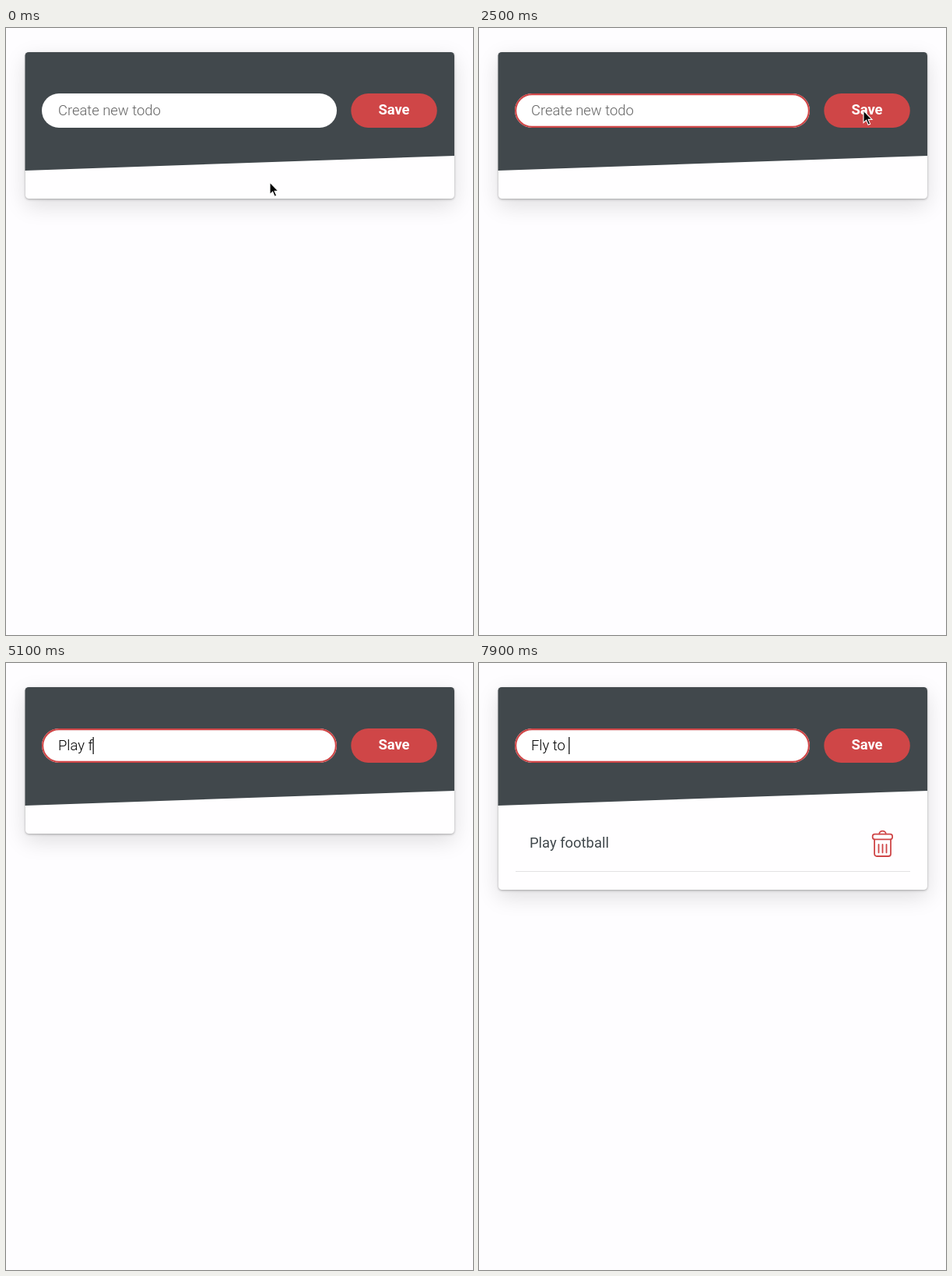
Recreate the animation shown at these times as an HTML page. Size 600x779 px, loop 8000 ms.

```html
<!DOCTYPE html>
<html lang="en">
<head>
<meta charset="utf-8">
<title>Todo list</title>
<style>
html, body { margin: 0; width: 100%; height: 100%; overflow: hidden; background: #fefdff; }
#card {
  position: absolute; left: 24.5px; top: 31px; width: 551.5px; height: 188px;
  border-radius: 4.5px; background: #fffeff;
  box-shadow: 0 1px 3px rgba(0,0,0,.3), 0 9px 28px rgba(0,0,0,.13);
}
svg { position: absolute; left: 0; top: 0; }
text { font: 18.4px Roboto, sans-serif; white-space: pre; }
</style>
</head>
<body>
<div id="card"></div>
<svg width="600" height="779" viewBox="0 0 600 779">
  <path d="M24.5 183V35.5a4.5 4.5 0 0 1 4.5-4.5H571.5a4.5 4.5 0 0 1 4.5 4.5V164Z" fill="#41484c"/>
  <rect x="46" y="84" width="379" height="44" rx="22" fill="#fff"/>
  <rect id="ring" x="47.1" y="85.1" width="376.8" height="41.8" rx="20.9" fill="none" stroke="#cf4647" stroke-width="2.2"/>
  <text id="field" x="67" y="112.3" style="font-weight:300"></text>
  <rect id="caret" y="95" width="1.2" height="22"/>
  <rect x="443.3" y="84" width="110.5" height="44" rx="22" fill="#cf4647"/>
  <text x="498.5" y="111.3" text-anchor="middle" fill="#fff" style="font-weight:700">Save</text>
  <g id="item">
    <text x="65" y="237.3" fill="#41484c">Play football</text>
    <path d="M47 267.5H554" stroke="#e2e1e3"/>
    <g fill="none" stroke="#cf4647" stroke-width="1.8" stroke-linecap="round">
      <rect x="505.7" y="219.6" width="25.4" height="6.8" rx="2.8"/>
      <path d="M514.3 219.3a4.2 3.6 0 0 1 8.4 0M508.1 226.6V245a3 3 0 0 0 3 3H526a3 3 0 0 0 3-3V226.6M513.5 233V243.3M518.5 233V243.3M523.5 233V243.3"/>
    </g>
  </g>
  <path id="arrow" d="M0 0V15.6L3.6 12.3 6.1 18.2 8.6 17.1 6.1 11.4H11Z" stroke="#fff" stroke-width="1.1"/>
  <path id="beam" d="M-3.5-8.5Q0-8.5 0-6Q0-8.5 3.5-8.5M0-6V6M-3.5 8.5Q0 8.5 0 6Q0 8.5 3.5 8.5M-2 2H2" fill="none" stroke="#000" stroke-width="1.3"/>
</svg>
<script>
const $ = id => document.getElementById(id);
const show = (el, on) => el.setAttribute('visibility', on ? 'visible' : 'hidden');
const ramp = (t, from, to) => Math.min(1, Math.max(0, (t - from) / (to - from)));

const LOOP = 8000, STEP = 100, BLINK = 260;
const TYPING = 4400, ADDED = 6100;

// Pointer path: time, x, y
const path = [
  [50, 339, 198], [400, 170, 102], [1750, 170, 102], [2000, 412, 83],
  [2400, 494, 106], [2700, 494, 106], [3000, 349, 50], [3300, 323, 101]
];

// Field value from each time on; null means no focus
const edits = [
  [0, null], [450, ''], [2800, null], [3340, ''],
  [4400, 'P'], [4600, 'Pl'], [4800, 'Pla'], [5000, 'Play '], [5100, 'Play f'],
  ...[...'ootball'].map((_, i) => [5300 + i * 100, 'Play football'.slice(0, 7 + i)]),
  [6060, ''], [7300, 'F'], [7500, 'Fl'], [7600, 'Fly '], [7800, 'Fly to'], [7900, 'Fly to ']
];

function pointerAt(t) {
  const next = path.findIndex(p => p[0] > t);
  if (next === 0) return path[0].slice(1);
  if (next < 0) return path.at(-1).slice(1);
  const [t0, x0, y0] = path[next - 1], [t1, x1, y1] = path[next];
  const k = ramp(t, t0, t1);
  return [x0 + (x1 - x0) * k, y0 + (y1 - y0) * k];
}

function drawField(t) {
  const [since, value] = edits.findLast(e => e[0] <= t);
  const field = $('field');
  field.textContent = value || 'Create new todo';
  field.setAttribute('fill', value ? '#000' : '#656565');
  $('caret').setAttribute('x', 67 + (value ? field.getComputedTextLength() : 0));
  show($('caret'), value !== null && t >= 600 && Math.floor((t - since) / BLINK) % 2 === 0);
  const focus = t < 3200 ? ramp(t, 540, 900) - ramp(t, 2850, 3200) : ramp(t, 3320, 3500);
  $('ring').setAttribute('opacity', focus);
}

function drawPointer(t) {
  const [x, y] = pointerAt(t);
  const overField = x > 46 && x < 425 && y > 84 && y < 128;
  for (const id of ['arrow', 'beam']) {
    $(id).setAttribute('transform', `translate(${x} ${y})`);
    show($(id), t < TYPING && overField === (id === 'beam'));
  }
}

function draw(now) {
  const t = Math.floor(now % LOOP / STEP) * STEP;
  drawField(t);
  drawPointer(t);
  show($('item'), t >= ADDED);
  $('card').style.height = (t >= ADDED ? 260 : 188) + 'px';
  requestAnimationFrame(draw);
}
requestAnimationFrame(draw);
</script>
</body>
</html>
```
